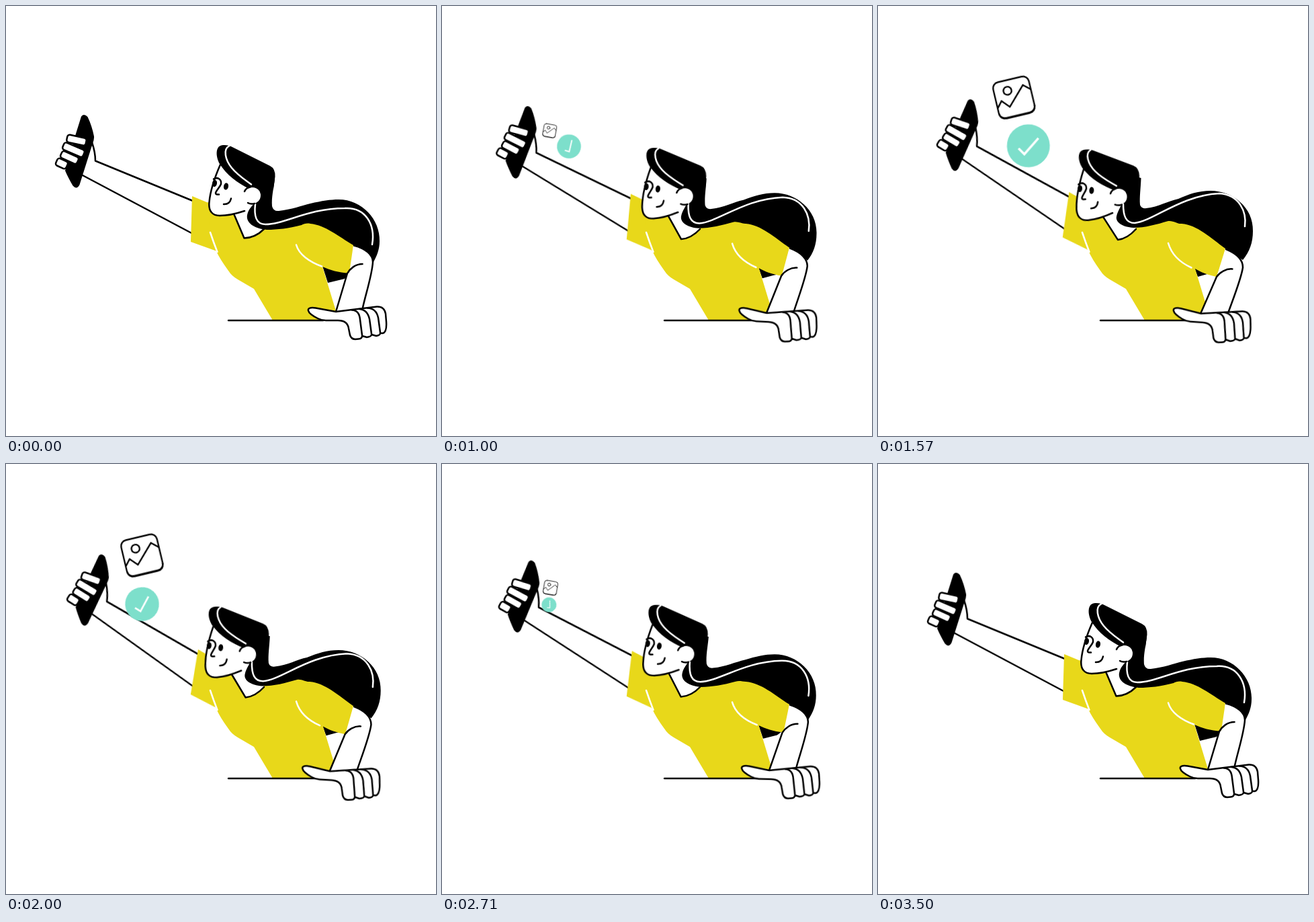
An HTML page that plays this animation: 640 by 640 pixels, repeating every 3570 ms.

```html
<!DOCTYPE html>
<html lang="en">
<head>
<meta charset="utf-8">
<title>Selfie</title>
<style>
  html, body { margin: 0; width: 100%; height: 100%; overflow: hidden; background: #fff; }
  svg { display: block; width: 100%; height: 100%; }

  :root { --t: 0; }

  .anim {
    animation: 3.57s linear infinite paused;
    animation-delay: calc(var(--t) * -1ms);
  }
  .line { fill: none; stroke: #000; stroke-width: 2.5; stroke-linecap: round; stroke-linejoin: round; }
  .shape { fill: #fff; }
  .shine { fill: none; stroke: #fff; stroke-width: 2.5; stroke-linecap: round; }
  .shirt { fill: #e8d81a; }

  /* paths lean from pose --a to pose --b and back */
  .sway { animation-name: sway; }
  .neck { animation-name: nod-neck; }
  .arm { transform-origin: 334px 346px; animation-name: arm; }
  .head { transform-origin: 367px 282px; animation-name: nod; }
  .hand { transform-origin: 450px 452px; animation-name: hand; }
  .photo { animation-name: photo; }
  .tick { animation-name: tick; }
  .sway, .arm, .hand { animation-timing-function: cubic-bezier(.333, 0, .667, 1); }

  @keyframes sway {
    0%, 100% { d: var(--a); }
    42% { d: var(--b); }
  }
  @keyframes nod-neck {
    0%, 98%, 100% { d: var(--a); }
    45% { d: var(--b); }
  }
  @keyframes arm {
    0%, 100% { transform: rotate(0deg); }
    60% { transform: rotate(7.75deg); }
  }
  @keyframes nod {
    0%, 98%, 100% { transform: translate(0px, 0px) rotate(0deg); }
    45% { transform: translate(-8.6px, 2px) rotate(-6deg); }
  }
  @keyframes hand {
    0%, 100% { transform: translate(0px, 0px) rotate(0deg); }
    42% { transform: translate(-10px, 0px) rotate(3.9deg); }
  }
  @keyframes photo {
    0% { transform: translate(138px, 212px) rotate(23deg) scale(0); }
    14% { transform: translate(138px, 212px) rotate(23deg) scale(0); animation-timing-function: cubic-bezier(.333, 0, .667, 1); }
    52% { transform: translate(210.5px, 126px) rotate(-18deg) scale(1.14); }
    87.5%, 100% { transform: translate(138px, 212px) rotate(23deg) scale(0); }
  }
  @keyframes tick {
    0%, 6% { transform: translate(125px, 210px) rotate(-62deg) scale(0); }
    14% { transform: translate(148px, 210px) rotate(-52deg) scale(.2); }
    28% { transform: translate(189px, 209px) rotate(-30deg) scale(.55); }
    45% { transform: translate(226px, 208px) rotate(0deg) scale(1.01); }
    68% { transform: translate(177px, 209px) rotate(-31deg) scale(.52); }
    86% { transform: translate(137px, 210px) rotate(-58deg) scale(.11); }
    90.5%, 100% { transform: translate(126px, 210px) rotate(-62deg) scale(0); }
  }
</style>
</head>
<body>
<svg viewBox="0 0 640 640">
  <!-- raised arm with phone -->
  <g class="anim arm">
    <path class="line" d="M128 203 C131 212 133 222 133 230.5 L278 290 M114 252 L278 339"/>
    <path d="M112 164.5 Q116 159.5 121.5 165 C126 174 129 184 131 194 Q131.5 199 128.5 206 L109.5 266 Q105.5 274 99.5 267.5 C95 260 91 252 88 245 L104 190 Z"/>
    <g class="line shape">
      <rect x="-14.5" y="-5.7" width="29" height="11.4" rx="3.5" transform="translate(105 199.7) rotate(12)"/>
      <rect x="-16.5" y="-5.7" width="33" height="11.4" rx="3.5" transform="translate(100.5 214) rotate(23)"/>
      <rect x="-13.5" y="-5.5" width="27" height="11" rx="3.5" transform="translate(94.5 225.5) rotate(24)"/>
      <rect x="-8.5" y="-5.8" width="17" height="11.6" rx="3.5" transform="translate(83 234.5) rotate(24)"/>
    </g>
    <path class="shirt" d="M277 283 L306 295 L345 340 L314 365 L275 351 Z"/>
  </g>

  <!-- body -->
  <path class="anim sway" style="
    --a: path('M471 387 L511 396 L504 406 L479 412 Z');
    --b: path('M471 390 L500 400 L490 399 L476 403 Z')"/>
  <path class="shirt anim sway" style="
    --a: path('M300 292 L338 306 L355 320 L440 318 L470 318 L517 356 Q516 378 510.5 397.5 C495 397 482 393 471 388 L492 457 L478 468 L397 468 L369 421 L345 407 Q336 402 331 394 Q318 376 313 365 L304 337 Z');
    --b: path('M300 292 L338 306 L355 320 L432 316 L470 318 L517 361 Q512 384 503.5 403 C490 400 480 396 472 391 L492 457 L478 468 L397 468 L369 421 L345 407 Q336 402 331 394 Q318 376 313 364 L304 337 Z')"/>
  <path class="shine" d="M304 337 Q309 352 314.5 366"/>
  <path class="shine anim sway" style="
    --a: path('M432 355.5 C436 370 452 381 470 387.5');
    --b: path('M432 353 C437 370 450 382 466.5 389.5')"/>
  <path class="line" d="M331 468 H472"/>
  <path class="shape anim neck" style="
    --a: path('M338.5 308 L354.5 345.5 Q371 345 384 332 L378 290 L340 300 Z');
    --b: path('M335 314 L357 348 Q371 346.5 384 332 L372 290 L337 304 Z')"/>
  <path class="line anim neck" style="
    --a: path('M338.5 308 L354.5 345.5 Q371 345 384 332');
    --b: path('M335 314 L357 348 Q371 346.5 384 332')"/>

  <!-- long hair -->
  <path class="anim sway" style="
    --a: path('M390 254 L400 258 C398 274 395 284 396 298 Q398 306 406 305 C425 303 440 297 453 294 C470 290 483 288 495 288 C530 288 557 318 556 350 C556 362 552 372 547 381 L517 356 C495 343 475 326 453 324 C448 323 443 324 440 326 C420 331 405 333 388 333 C368 331 357 322 359 311 C361 302 366 298 371 292 L371 270 Z');
    --b: path('M380 253 L391.5 256 C391 272 389 284 390 296 Q392 302 399 301 C418 299 432 290 447 287 C463 280 477 275 495 275 C528 275 559 300 558 335 C558 352 553 366 543 378 L517 361 C495 345 475 326 452 324 C446 325 440 319 432 320 C415 325 398 330 380 330 C364 329 353 322 355 313 C357 304 362 299 363 292 L363 270 Z')"/>
  <path class="shine anim sway" style="
    --a: path('M371 295 C369 312 372 325 386 325 C415 325 450 301 504 301 C535 299 550 325 545 355');
    --b: path('M365 295 C365 313 369 323 382 323 C410 320 450 282 508 279 C538 281 549 306 546 328')"/>

  <!-- leaning arm -->
  <path class="shape anim sway" style="
    --a: path('M517 356 C535 361 546 370 546 381 C545 400 535 430 531 449 L530 460 L491 455 L508 398 L511 397 Z');
    --b: path('M517 361 C535 369 543 379 543 389 C541 405 527 440 521 457 L518 466 L480 458 L504 403 L504 403 Z')"/>
  <path class="line anim sway" style="
    --a: path('M518 356.5 C535 361 546 370 546 381 C545 400 535 430 531 449 M530.5 384 C520 384 512 391 508 398 L491 455');
    --b: path('M518 362 C535 369 543 379 543 389 C541 405 527 440 521 457 M527.5 391.5 C518 390.5 508 397 504 403 L480 458')"/>
  <g class="anim hand">
    <path class="line shape" d="M491 455 L461 449.5 C453 448 449 450 450 453.5 C451 458 458 462 464 465 Q470 468 476 468 L494 468 C504 468 509 473 510 480 L512 490 Q514 496 520 496 L525 495.5 Q530 495 530 491 L537 493 Q544 492 544 489 L551 491 Q557 490 557 487 L561 487 Q567 485 566 470 L565 458 Q563 447 552 447.5 L515 452 Z"/>
    <path class="line" d="M515 452.5 Q526 453 527 467 L530 490 M526 451 Q538 452 541 466 L544 488 M538 449.5 Q551 450 554 464 L557 486"/>
  </g>

  <!-- head -->
  <g class="anim head">
    <path class="shape" d="M319 236 C312 252 304 275 302.5 292 C301 306 308 312 318 312 C330 312 345 309 355 305 L368 292 L362 266 Z"/>
    <path class="line" d="M319 236 C312 252 304 275 302.5 292 C301 306 308 312 318 312 C330 312 343 309 355 305"/>
    <ellipse cx="310.5" cy="264" rx="3.5" ry="5.2" transform="rotate(10 310.5 264)"/>
    <ellipse cx="327.5" cy="268.5" rx="3.5" ry="5.2" transform="rotate(10 327.5 268.5)"/>
    <path class="line" d="M309 257.5 C315 254 321 258 320 265 C318 270 314 273 312 278 Q311.5 281 317 280.5 M324 295 Q333 295.5 335 286.5"/>
    <path d="M325 207 Q332 207 339 211 L393 238 Q401 242 400.5 254 L398 272 L380 290 L362 272 C345 264 328 251 318 235 C312 224 312 211 319 208 Q322 206.5 325 207 Z"/>
    <path class="shine" d="M332 208.5 C323 213 326 229 336 241 C345 252 355 258 365 265.5"/>
    <circle class="shape" cx="367" cy="282" r="12"/>
    <path class="line" d="M355 276 Q357 271 363 269.5 M360 293 Q364 295.5 370 294"/>
  </g>

  <!-- pop-up badges -->
  <g class="anim photo">
    <g class="line" style="stroke-width: 2.3px">
      <rect class="shape" x="-27" y="-27" width="54" height="54" rx="9"/>
      <path d="M-27 19 Q-26 28 -17 28 H17 Q26 28 27 19"/>
      <circle cx="-7" cy="-11.5" r="6"/>
      <path style="stroke-linejoin: miter" d="M-26.5 10 L-19 1.3 L-9 12.3 L17 -14.5 L26.6 -6"/>
    </g>
  </g>
  <g class="anim tick">
    <circle r="32.5" fill="#7ddfcb"/>
    <path d="M-15 3.5 L-6.500 12.5 L15.5 -11" fill="none" stroke="#fff" stroke-width="3.4"/>
  </g>
</svg>
<script>
  // All motion lives in the keyframes; this clock steps them at 14 pictures a second.
  const LOOP = 3570, STEPS = 50, STEP = LOOP / STEPS;
  const start = performance.now();

  function tick() {
    const t = performance.now() - start;
    const step = Math.floor((t + 9) / STEP) % STEPS;
    document.documentElement.style.setProperty('--t', step * STEP);
    requestAnimationFrame(tick);
  }
  tick();
</script>
</body>
</html>
```
